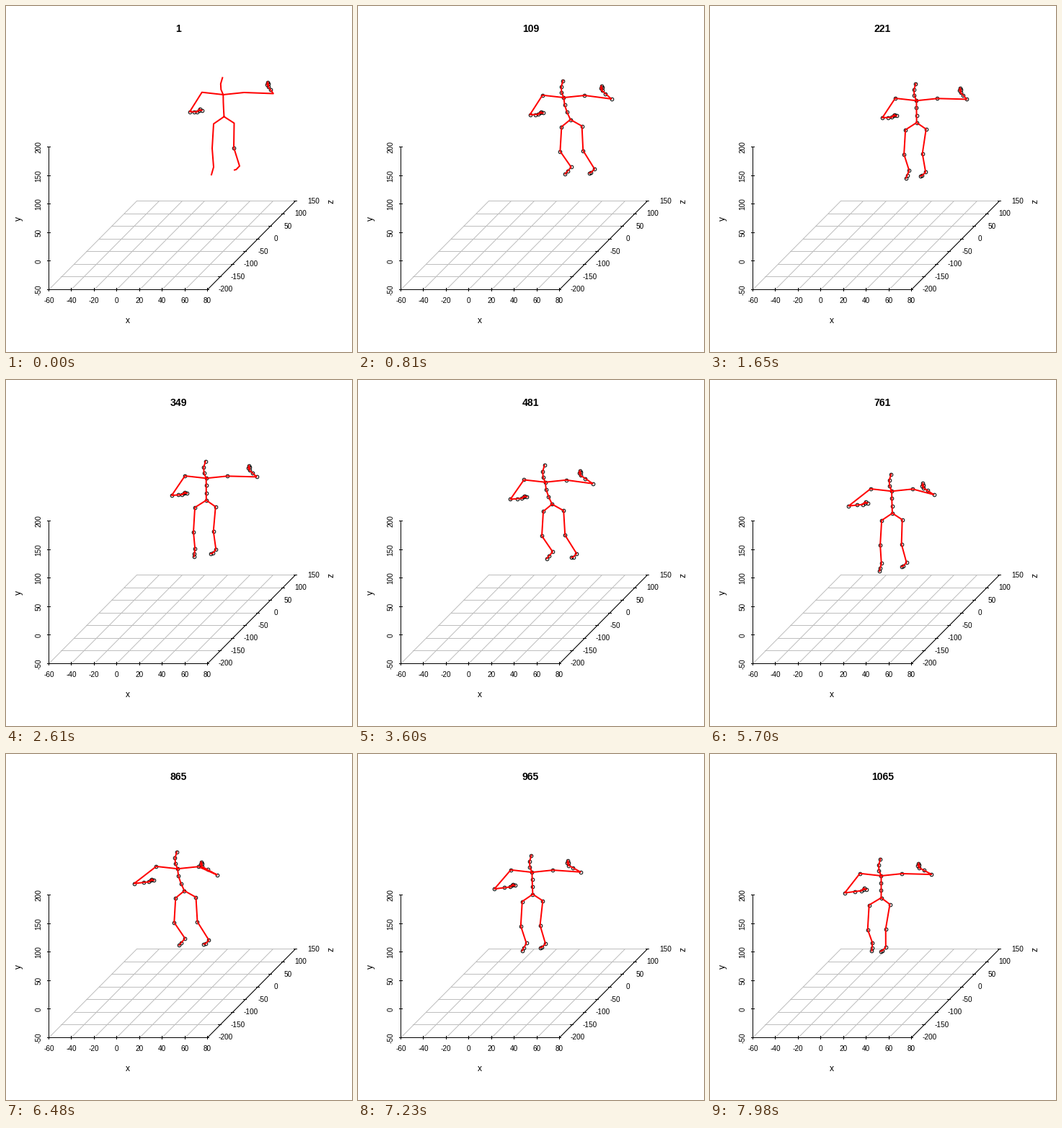
A matplotlib script that plays this animation: 480 px wide and 480 px high, repeating every 8 s.

```python
import numpy as np
import matplotlib.pyplot as plt
from matplotlib.animation import FuncAnimation

SIZE, DPI = 480, 80
PX = 72 / DPI          # one pixel in points
LOOP, STEPS = 8000, 267
CYCLE = 96             # steps in one gait cycle

plt.rcParams.update({"font.family": "Liberation Sans", "toolbar": "None"})


def chain(start, *moves):
    """Joints reached by adding each move in turn."""
    return np.array(start) + np.cumsum(moves, axis=0)


def hand(wrist, reach, finger, tip, thumb):
    """Palm, knuckle, finger, tip and thumb; the last three hang off the knuckle."""
    reach = np.array(reach)
    knuckle = wrist + reach
    return np.array([wrist + 0.63 * reach, knuckle,
                     knuckle + finger, knuckle + tip, knuckle + thumb])


def pose(k):
    """Joint positions in pixels: spine, left leg, right leg, left arm, right arm."""
    t = k / (STEPS - 1)
    phase = 2 * np.pi * (k - 120) / CYCLE
    c, s, c2 = np.cos(phase), np.sin(phase), np.cos(2 * phase)
    lean = ((1 + c) / 2) ** 3                    # trunk leans once per cycle
    turn = np.exp(-((k - 203) / 28) ** 2)        # shoulders turn late in the walk
    arc = np.sin(np.pi * t)

    pelvis = np.array([302 - 65 * t - 4 * arc, 153 + 46 * t - 2 * arc])
    u = np.linspace(1, 0, 4)
    trunk = pelvis + np.column_stack([-9.5 * lean * np.sin(u * np.pi / 2), -30.5 * u])
    chest = trunk[0]
    head = chest + np.array([(-1, -23.5), (-3.5, -15), (-3, -7)])
    spine = np.vstack([head, trunk])

    foot = np.array([-4.5 - 3.5 * c - 1.5 * s, 10.5 - c])
    left_leg = chain(pelvis, (-14.5 + 2.3 * c, 10), (-2, 34),
                     (8 + 4 * c + 3 * s + 3 * c2, 22.5 + 2 * c - s - 2.5 * c2),
                     0.62 * foot, 0.38 * foot)
    right_leg = chain(pelvis, (14 + 2 * c, 9), (-2 + 4 * c - 1.5 * s, 34),
                      (8 + 8 * c, 25.5), (-4.7, 4.9), (-2.3, 0.6))

    left_arm = chain(chest, (-29.5, -3.3), (-17 - 4 * t - 13 * turn, 27 - 4 * turn))
    left_hand = hand(left_arm[1], (10 + 13 * t, -3 * t), (3, -2), (7, -2), (4, -3.5))
    right_arm = chain(chest, (29, -3),
                      (41 - 14 * turn - 4 * lean, 1 + 8 * turn + 4 * lean))
    right_hand = hand(right_arm[1], (-6 - 11 * t - 6 * lean, -9 - 2.5 * lean),
                      (-2, -3.3), (-1, -6.5), (0, -4))
    return (spine, left_leg, right_leg,
            np.vstack([left_arm, left_hand]), np.vstack([right_arm, right_hand]))


fig = plt.figure(figsize=(SIZE / DPI, SIZE / DPI), dpi=DPI, facecolor="white")
ax = fig.add_axes([0, 0, 1, 1])
ax.set(xlim=(-0.5, SIZE - 0.5), ylim=(SIZE - 0.5, -0.5))
ax.axis("off")


def line(x, y, color="black"):
    ax.plot(np.round(x), np.round(y), color=color, lw=PX, snap=False, zorder=1)


def label(x, y, text, size=10, **kw):
    return ax.text(x, y, text, fontsize=size * PX, ha="center", va="center", **kw)


# Floor: front edge, then depth offset of the back edge.
X0, X1, Y0, TOP = 59, 279, 393, 195
DX, DY = 122, -123
EIGHTHS = np.linspace(0, 1, 8)

for f in EIGHTHS:
    x = X0 + f * (X1 - X0)
    line([x, x + DX], [Y0, Y0 + DY], "#bebebe")
    line([X0 + f * DX, X1 + f * DX], [Y0 + f * DY] * 2, "#bebebe")

line([X0, X1], [Y0, Y0])
line([X0, X0], [Y0, TOP])
line([X1, X1 + DX], [Y0, Y0 + DY])

for i, f in enumerate(EIGHTHS):
    x = X0 + f * (X1 - X0)
    line([x, x], [Y0 - 2, Y0 + 2])
    label(x, 408, str(-60 + 20 * i))
    x, y = X1 + f * DX, Y0 + f * DY
    line([x - 2, x + 2], [y, y])
    label(x + 25, y, str(-200 + 50 * i))

for i, f in enumerate(np.linspace(0, 1, 6)):
    y = Y0 + f * (TOP - Y0)
    line([X0 - 2, X0 + 2], [y, y])
    label(45, y, str(-50 + 50 * i), rotation=90)

label(168, 436, "x", 12)
label(17, 294, "y", 12, rotation=90)
label(451, 270, "z", 12, rotation=90)
title = label(239, 31, "", 14, weight="bold")

joints, = ax.plot([], [], "o", ms=4.6 * PX, mfc="none", mec="black",
                  mew=PX, snap=False, zorder=2)
bones, = ax.plot([], [], color="red", lw=2 * PX, snap=False,
                 solid_joinstyle="round", zorder=3)
GAP = np.full((1, 2), np.nan)


def draw(k):
    spine, left_leg, right_leg, left_arm, right_arm = limbs = pose(k)
    chest, pelvis = spine[3], spine[6]
    parts = [spine]
    for leg in (left_leg, right_leg):
        parts += [GAP, pelvis, leg]
    for arm in (left_arm, right_arm):
        parts += [GAP, chest, arm[:6], GAP, arm[[3, 6]]]
    bones.set_data(*np.vstack(parts).T)
    # The opening pose marks only the hands and one knee.
    marks = limbs if k else (left_arm[1:], right_arm[2:], right_leg[1:2])
    joints.set_data(*np.vstack(marks).T)
    title.set_text(str(1 + 4 * k))
    return bones, joints, title


anim = FuncAnimation(fig, draw, frames=STEPS, interval=LOOP / STEPS,
                     repeat=True, repeat_delay=0, blit=False)
plt.show()
```
